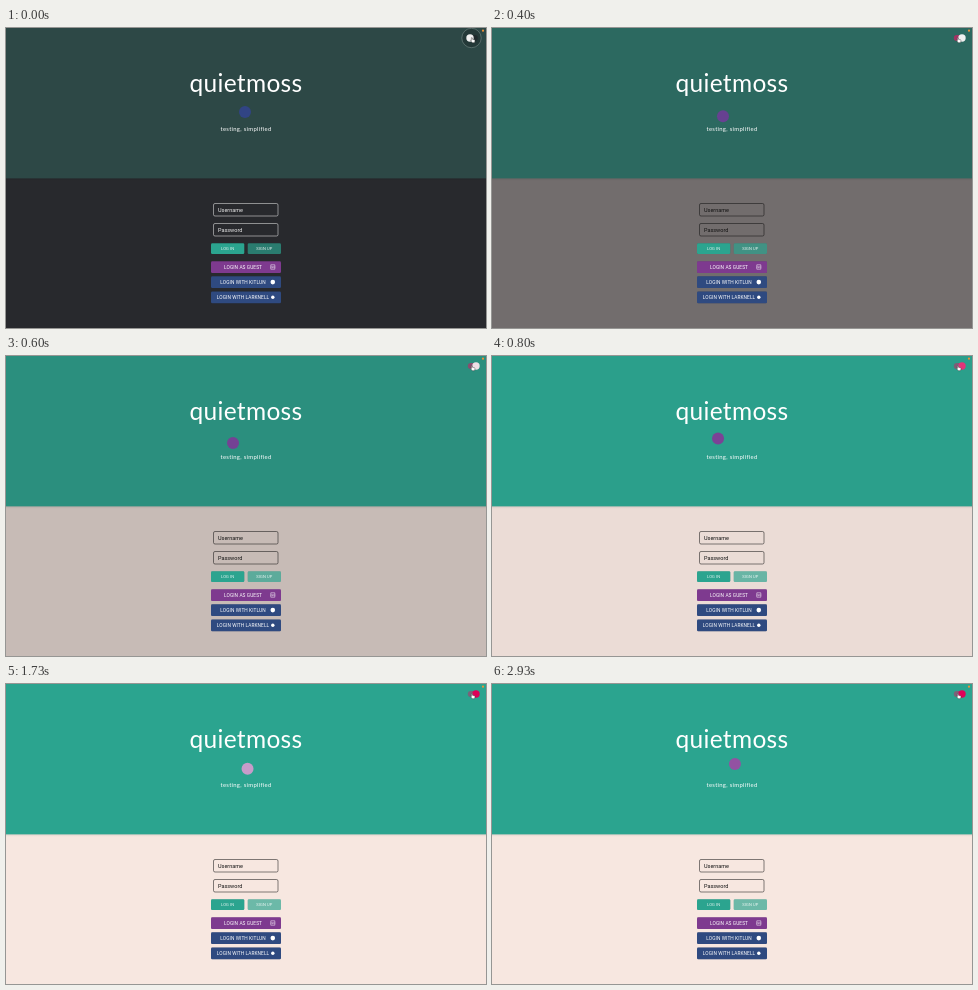
These frames come from a looping animation (480 px wide and 300 px high, 2990 ms). An HTML page:

```html
<!DOCTYPE html>
<html lang="en">
<head>
<meta charset="utf-8">
<title>Login theme switch</title>
<style>
  html, body { margin: 0; width: 100%; height: 100%; overflow: hidden; }
  svg { display: block; width: 100vw; height: 100vh; }
  text { fill: #fff; font-family: Roboto, Arial, sans-serif; font-weight: 400; }
  .title { font: 400 24.5px Lato, sans-serif; letter-spacing: .3px; }
  .tag { font: 400 5.9px Lato, sans-serif; letter-spacing: .3px; }
  .mid { text-anchor: middle; }
  .small { font-size: 4px; letter-spacing: .15px; fill-opacity: .9; }
  .wide { font-size: 4.8px; letter-spacing: .08px; }
  .field text { font-size: 5.5px; fill: currentColor; }
  .field rect { fill: none; stroke: currentColor; stroke-width: .7; stroke-opacity: .75; }
  .btn { filter: drop-shadow(0 .5px .6px #0003); }
</style>
</head>
<body>
<svg viewBox="0 0 480 300">
  <defs>
    <linearGradient id="shade" x2="0" y2="1">
      <stop stop-opacity=".08"/>
      <stop offset="1" stop-opacity="0"/>
    </linearGradient>
  </defs>
  <rect id="page" width="480" height="300"/>
  <rect id="head" width="480" height="150.4"/>
  <rect y="150.4" width="480" height="2.5" fill="url(#shade)"/>

  <text class="title mid" x="240" y="63.6">quietmoss</text>
  <circle id="mark" r="6"/>
  <text class="tag mid" x="240" y="103.2">testing, simplified</text>

  <g id="fields" class="field">
    <rect x="207.5" y="175.5" width="64.5" height="12.5" rx="1.5"/>
    <text x="212" y="183.5">Username</text>
    <rect x="207.5" y="195.5" width="64.5" height="12.5" rx="1.5"/>
    <text x="212" y="203.5">Password</text>
  </g>

  <g fill="#2ba48f">
    <rect class="btn" x="205" y="215.2" width="33.3" height="10.8" rx="1.3"/>
    <rect class="btn" x="241.7" y="215.2" width="33.3" height="10.8" rx="1.3" opacity=".68"/>
  </g>
  <text class="small mid" x="221.7" y="221.9">LOG IN</text>
  <text class="small mid" x="258.4" y="221.9">SIGN UP</text>

  <rect class="btn" x="205" y="233.2" width="70" height="11.8" rx="1.3" fill="#7e3a8f"/>
  <g fill="#2f4a80">
    <rect class="btn" x="205" y="248.3" width="70" height="11.8" rx="1.3"/>
    <rect class="btn" x="205" y="263.4" width="70" height="11.8" rx="1.3"/>
  </g>
  <text class="wide mid" x="237" y="240.7">LOGIN AS GUEST</text>
  <text class="wide mid" x="237" y="255.8">LOGIN WITH KITLUN</text>
  <text class="wide mid" x="237" y="271">LOGIN WITH LARKNELL</text>
  <path d="M264.8 238.6v-1.8h4v1.8M264.2 238.9h5.2M264.8 239v2.2h4V239M266.8 239v1.2" fill="none" stroke="#fff" stroke-width=".5"/>
  <circle cx="266.8" cy="254.1" r="2.3" fill="#fff"/>
  <circle cx="266.8" cy="269.3" r="1.7" fill="#fff"/>

  <circle id="halo" cx="465.5" cy="10" r="9.7" fill="#0003" stroke="#b9c4c2" stroke-opacity=".45" stroke-width=".7"/>
  <rect id="track" x="461.8" y="7" width="10" height="6" rx="3"/>
  <circle id="knob" cy="10" r="3.7"/>
  <path d="M465.4 9.8q.8-.7 1.1.2v1.3l2 .5q.7.3.5 1.2l-.5 1.7h-2.2l-1.9-2.2q.3-.7 1 0z" fill="#fff" stroke="#222" stroke-width=".4"/>
  <circle cx="477" cy="2.7" r="1.1" fill="#ef9136"/>
</svg>
<script>
const LOOP = 2990, CLICK = 213, FADE = 830;
const $ = id => document.getElementById(id);

// time, x, y: a slow figure of eight
const path = [
  [0, 239, 84], [330, 233, 88], [470, 229, 88], [600, 227, 87], [900, 226.5, 80.5],
  [1200, 233, 77], [1650, 240, 84], [2200, 251, 86], [2600, 255, 80.5],
  [2760, 250, 77], [2930, 243, 80], [2990, 239, 84]
];
// time, red, green, blue
const tints = [
  [0, 49, 68, 132], [330, 98, 64, 144], [600, 116, 66, 148], [1200, 138, 66, 154],
  [1600, 160, 90, 172], [1900, 250, 240, 240], [2600, 250, 240, 240],
  [2930, 146, 82, 162], [2990, 146, 82, 162]
];

const clamp = v => Math.min(1, Math.max(0, v));
const lerp = (a, b, k) => a + (b - a) * k;
const mix = (a, b, k) => `rgb(${a.map((v, i) => Math.round(lerp(v, b[i], k)))})`;

// CSS "ease", solved by bisection
function ease(x) {
  if (x <= 0 || x >= 1) return clamp(x);
  const bez = (p, q, s) => 3 * p * s * (1 - s) ** 2 + 3 * q * s * s * (1 - s) + s ** 3;
  let lo = 0, hi = 1;
  for (let n = 0; n < 20; n++) {
    const s = (lo + hi) / 2;
    if (bez(.25, .25, s) < x) lo = s; else hi = s;
  }
  return bez(.1, 1, lo);
}

function segment(keys, t) {
  let i = 0;
  while (i < keys.length - 2 && t >= keys[i + 1][0]) i++;
  return [i, (t - keys[i][0]) / (keys[i + 1][0] - keys[i][0])];
}

// Smooth curve through the path points
function spot(t, axis) {
  const [i, k] = segment(path, t), a = path[i], b = path[i + 1];
  const slope = n => {
    const p = path[Math.max(0, n - 1)], q = path[Math.min(path.length - 1, n + 1)];
    return (q[axis] - p[axis]) / (q[0] - p[0]);
  };
  const d = b[0] - a[0], k2 = k * k, k3 = k2 * k;
  return a[axis] * (2 * k3 - 3 * k2 + 1) + b[axis] * (3 * k2 - 2 * k3)
    + d * (slope(i) * (k3 - 2 * k2 + k) + slope(i + 1) * (k3 - k2));
}

function draw(now) {
  const t = now % LOOP, light = ease((t - CLICK) / FADE);
  const slide = ease((t - CLICK) / 130), pink = ease((t - 560) / 500);

  $('page').setAttribute('fill', mix([40, 41, 45], [247, 231, 224], light));
  $('head').setAttribute('fill', mix([45, 72, 70], [43, 164, 143], light));
  $('fields').style.color = t < CLICK ? '#eee' : '#111';

  const [i, k] = segment(tints, t);
  $('mark').setAttribute('fill', mix(tints[i].slice(1), tints[i + 1].slice(1), k));
  $('mark').setAttribute('cx', spot(t, 1));
  $('mark').setAttribute('cy', spot(t, 2));

  $('halo').setAttribute('opacity', 1 - slide);
  $('track').setAttribute('fill', mix([30, 40, 42], [205, 30, 100], slide));
  $('track').setAttribute('opacity', lerp(.85, .5, light));
  $('knob').setAttribute('cx', lerp(464, 470, slide));
  $('knob').setAttribute('fill', mix([240, 240, 240], [222, 0, 88], pink));
  requestAnimationFrame(draw);
}
draw(performance.now());
</script>
</body>
</html>
```
